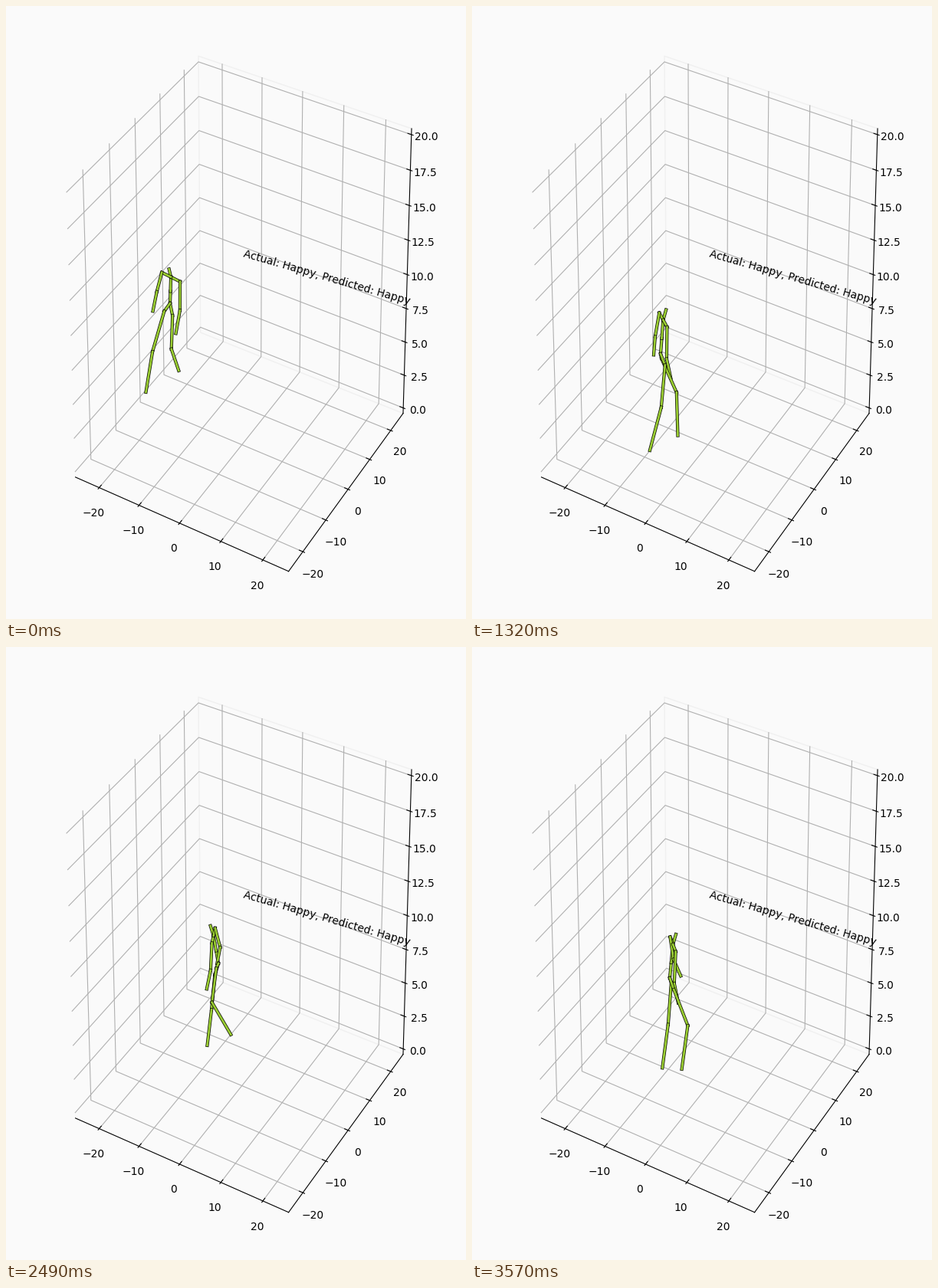
These frames come from a looping animation (600x800 px, 3.6 s). A matplotlib script:

```python
import numpy as np
import matplotlib.pyplot as plt
import matplotlib.patheffects as pe
from matplotlib.animation import FuncAnimation

W, H = 600, 800
PAD = 15
FRAMES, INTERVAL = 120, 30
EDGE = 25 / 48            # half side of the box, limits plus margin
LABEL_GAP = 11.5 * 48 / (0.72 * (W + H - 4 * PAD)) / 12
STRIDE = 31               # frames per gait cycle

AZIM, ELEV, DIST = np.radians(-60), np.radians(30), 10
RIGHT = np.array([-np.sin(AZIM), np.cos(AZIM), 0])
UP = np.array([-np.sin(ELEV) * np.cos(AZIM), -np.sin(ELEV) * np.sin(AZIM), np.cos(ELEV)])
TO_EYE = np.cross(RIGHT, UP)


def project(points):
    """Perspective view of box coordinates, in stage pixels (y down)."""
    p = np.asarray(points, float)
    depth = DIST - p @ TO_EYE
    x = PAD + (p @ RIGHT / depth + 0.095) / 0.185 * (W - 2 * PAD)
    y = H - PAD - (p @ UP / depth + 0.095) / 0.185 * (H - 2 * PAD)
    return np.stack([x, y], axis=-1)


# ---------------------------------------------------------------- scene
fig = plt.figure(figsize=(W / 100, H / 100), dpi=100, facecolor="#fafafa")
ax = fig.add_axes([0, 0, 1, 1])
ax.set_xlim(0, W)
ax.set_ylim(H, 0)
ax.axis("off")


def path3d(points, **style):
    ax.plot(*project(points).T, **style)


def label(point, text):
    x, y = project(point)
    ax.text(x, y, text, ha="center", va="top", fontsize=10, family="DejaVu Sans")


def draw_ticks(values, unit, fmt, grid, foot, tick_axis):
    """Grid lines, tick marks and labels of one axis.

    grid(v) gives the grid polyline, foot(v, gap) the point beside the axis.
    """
    sign = 1 if foot(0, 0)[tick_axis] > 0 else -1
    for value in values:
        v = unit(value)
        path3d(grid(v), color="#b0b0b0", lw=0.8, zorder=1)
        ends = np.array([foot(v, 0), foot(v, 0)], float)
        ends[:, tick_axis] += sign * np.array([1 / 120, -1 / 60])
        path3d(ends, color="black", lw=0.8, zorder=3)
        label(foot(v, LABEL_GAP), fmt(value))


def signed(value):
    return str(value).replace("-", "\u2212")


def draw_box():
    e = EDGE
    path3d([(e, e, e), (-e, e, e), (-e, e, -e), (e, e, -e)], color="#f0f0f0", lw=1, zorder=0)
    for a, b in [((-e, -e, -e), (e, -e, -e)),
                 ((e, -e, -e), (e, e, -e)),
                 ((e, e, -e), (e, e, e))]:
        path3d([a, b], color="black", lw=0.8, zorder=2)

    ground = range(-20, 21, 10)
    draw_ticks(ground, lambda v: v / 50, signed,
               lambda v: [(v, -e, -e), (v, e, -e), (v, e, e)],
               lambda v, g: (v, -e - g, -e - g), 1)
    draw_ticks(ground, lambda v: v / 50, signed,
               lambda v: [(-e, v, e), (-e, v, -e), (e, v, -e)],
               lambda v, g: (e + g, v, -e - g), 0)
    draw_ticks(np.arange(0, 20.1, 2.5), lambda v: v / 20 - 0.5, "{:.1f}".format,
               lambda v: [(-e, -e, v), (-e, e, v), (e, e, v)],
               lambda v, g: (e + g, e + g, v), 0)

    x, y = project((0, 0, 0))
    angle = np.degrees(np.arctan2(UP[0], RIGHT[0]))
    ax.text(x, y, "Actual: Happy, Predicted: Happy", rotation=angle,
            fontsize=10, family="DejaVu Sans", zorder=6)


draw_box()

# ---------------------------------------------------------------- walker
# Waypoints of the pelvis: frame, stage x, stage y, heading in degrees.
ROUTE = np.array([
    (0, 214, 388, -97),
    (15, 198, 414, -58),
    (44, 246, 454, 50),
    (64, 286, 433, 122),
    (83, 277, 413, 202),
    (98, 249, 415, 280),
    (119, 258, 432, 404),
], float)
TIMES, STOPS = ROUTE[:, 0], ROUTE[:, 1:]
SLOPES = np.gradient(STOPS, TIMES, axis=0, edge_order=2)

THIGH, SHANK = 0.14, 0.148
CHAINS = [
    ["root", "spine", "neck", "head"],
    ["neck", "l_shoulder", "l_elbow", "l_hand"],
    ["neck", "r_shoulder", "r_elbow", "r_hand"],
    ["root", "l_hip", "l_knee", "l_foot"],
    ["root", "r_hip", "r_knee", "r_foot"],
]
BONES = [pair for chain in CHAINS for pair in zip(chain, chain[1:])]


def route(n):
    """Smooth x, y and heading through the waypoints."""
    i = int(np.clip(np.searchsorted(TIMES, n, "right") - 1, 0, len(TIMES) - 2))
    h = TIMES[i + 1] - TIMES[i]
    t = (n - TIMES[i]) / h
    ease = 3 * t**2 - 2 * t**3
    return ((1 - ease) * STOPS[i] + ease * STOPS[i + 1]
            + h * t * (1 - t) * ((1 - t) * SLOPES[i] - t * SLOPES[i + 1]))


def leg_bone(length, degrees):
    """Forward, left and up parts; the legs lean out of the left turn."""
    a = np.radians(degrees)
    return np.array([length * np.sin(a), -0.02, -length * np.cos(a)])


def walk(n):
    """Joints around the pelvis as (forward, left, up)."""
    j = {"root": np.zeros(3), "neck": np.array([0.018, 0.018, 0.109])}
    j["spine"] = 0.46 * j["neck"]
    j["head"] = j["neck"] + (0.013, 0, 0.034)
    cycle = 2 * np.pi * (n - 44) / STRIDE

    # The left arm swings, the right one hangs back and outwards.
    for s, side, rest, swing, splay in (("l", 1, 0.003, 0.017, 0.013),
                                        ("r", -1, -0.016, 0, -0.039)):
        phase = cycle + (0 if side > 0 else np.pi)
        sway = swing * np.cos(phase)
        j[s + "_shoulder"] = j["neck"] + (0, side * 0.048, 0)
        j[s + "_elbow"] = j[s + "_shoulder"] + (rest - sway, splay, -0.09)
        j[s + "_hand"] = j[s + "_elbow"] + (0.015 - 1.2 * sway, splay / 4, -0.067)

        j[s + "_hip"] = np.array([0.012, side * 0.022, -0.031])
        j[s + "_knee"] = j[s + "_hip"] + leg_bone(THIGH, 8 + 18 * np.cos(phase))
        j[s + "_foot"] = j[s + "_knee"] + leg_bone(SHANK, -12 + 24 * np.cos(phase - 0.34 * np.pi))
    return j


def pose(n):
    x, y, heading = route(n)
    c, s = np.cos(np.radians(heading)), np.sin(np.radians(heading))
    turn = np.array([(c, s, 0), (-s, c, 0), (0, 0, 1)])
    shift = np.array([x, y]) - project((0, 0, 0))
    return {name: project(p @ turn) + shift for name, p in walk(n).items()}


outline = [pe.Stroke(linewidth=3, foreground="black"), pe.Normal()]
limbs = [ax.plot([], [], color="yellowgreen", lw=2, zorder=5, path_effects=outline,
                 solid_capstyle="projecting")[0] for _ in BONES]


def update(n):
    p = pose(n)
    for line, (a, b) in zip(limbs, BONES):
        line.set_data(*np.array([p[a], p[b]]).T)
    return limbs


anim = FuncAnimation(fig, update, frames=FRAMES, interval=INTERVAL, repeat=True)
plt.show()
```
